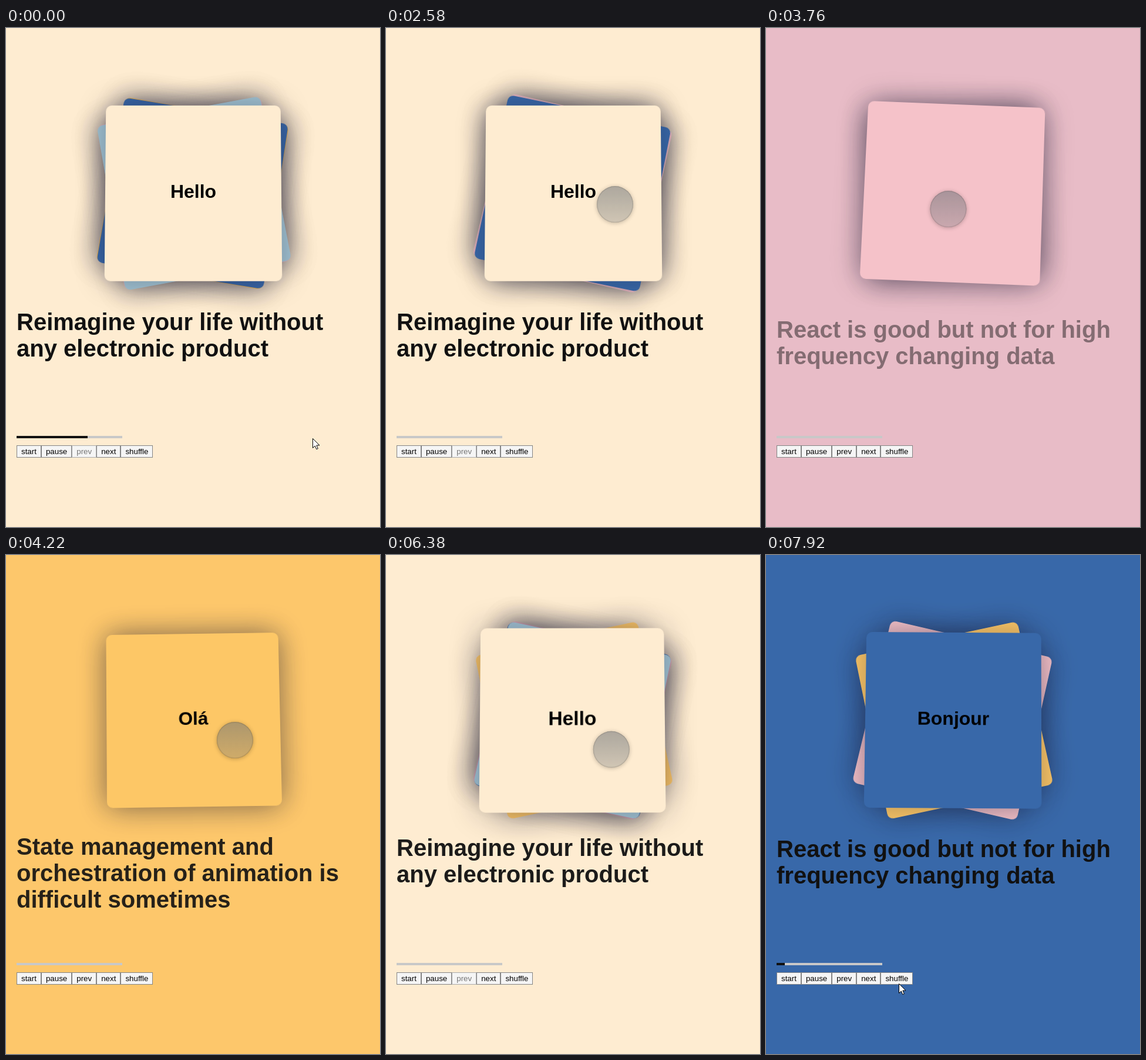
Animation of 637 by 849 pixels, one loop 8 s. Source, as an HTML page:

```html
<!DOCTYPE html>
<html lang="en">
<head>
<meta charset="utf-8">
<style>
  html, body { margin: 0; height: 100%; overflow: hidden; }
  body { position: relative; font-family: "Liberation Sans", Arial, "Noto Sans CJK JP", sans-serif; }
  .card, h1, #bar, #controls, #touch, #arrow, #popup { position: absolute; }
  .card {
    left: 168.5px; top: 129.5px; width: 300px; height: 300px; border-radius: 10px;
    font: bold 32px/297px "Liberation Sans", Arial, "Noto Sans CJK JP", sans-serif; text-align: center;
    box-shadow: 0 0 50px rgba(20, 20, 45, .33);
  }
  h1 { left: 18px; top: 478px; margin: 0; font-size: 40px; line-height: 45px; white-space: pre; color: #111; }
  #bar { left: 18px; top: 694px; width: 180px; height: 4px; background: #c8c8c8; }
  #fill { height: 4px; background: #111; }
  #controls { left: 18px; top: 710px; display: flex; }
  button {
    margin: 0; padding: 2px 7px; border: 1px solid #858585; border-radius: 0; height: 21px;
    font: 13.333px/15px "Liberation Sans", Arial, sans-serif; background: #f5f5f5; color: #000;
  }
  button:disabled { color: #777; border-color: #aaa; }
  #touch {
    left: -31px; top: -31px; width: 62px; height: 62px; border-radius: 50%; z-index: 20;
    background: linear-gradient(rgba(105, 110, 115, .55), rgba(105, 110, 115, .3));
    box-shadow: inset 0 0 2px rgba(0, 0, 0, .45), 0 1px 7px rgba(0, 0, 0, .25);
  }
  #arrow { left: 0; top: 0; z-index: 20; overflow: visible; }
  #popup { left: 56px; top: 247px; width: 30px; height: 30px; border-radius: 5px; background: #dc3a43; z-index: 15; }
</style>
</head>
<body>
<div id="bar"><div id="fill"></div></div>
<div id="controls"><button>start</button><button>pause</button><button id="prev">prev</button><button>next</button><button>shuffle</button></div>
<div id="popup"></div>
<div id="touch"></div>
<svg id="arrow" width="14" height="20"><path d="M.5 .5V16.5L4.3 13L6.8 18.7L9.3 17.6L6.9 12H12Z" fill="#fff" stroke="#000"/></svg>
<script>
const LOOP = 8000;
const $ = id => document.getElementById(id);
const clamp = v => Math.max(0, Math.min(1, v));

const color = {
  cream: [254, 236, 209], blue: [56, 104, 169], yellow: [253, 199, 102],
  sky: [162, 196, 211], pink: [245, 194, 201]
};
const rgb = c => `rgb(${c.map(Math.round)})`;

// Keys are [time, ...values]; monotone cubic interpolation through all of them.
function track(keys, t) {
  const last = keys.length - 1;
  if (t <= keys[0][0]) return keys[0].slice(1);
  if (t >= keys[last][0]) return keys[last].slice(1);
  let i = 0;
  while (t >= keys[i + 1][0]) i++;
  const h = keys[i + 1][0] - keys[i][0], u = (t - keys[i][0]) / h;
  return keys[i].slice(1).map((a, n) => {
    const c = n + 1, b = keys[i + 1][c];
    const secant = k => (keys[k + 1][c] - keys[k][c]) / (keys[k + 1][0] - keys[k][0]);
    const slope = k => {
      if (k === 0 || k === last) return 0;
      const p = secant(k - 1), q = secant(k);
      return p * q > 0 ? 2 * p * q / (p + q) : 0;
    };
    const v = 1 - u;
    return a * v * v * (1 + 2 * u) + b * u * u * (3 - 2 * u) + h * u * v * (v * slope(i) - u * slope(i + 1));
  });
}

// Card keys: time, x, rotation, scale.
const cards = {
  h: { text: 'Hello', fill: 'cream', keys: [
    [2600, 0, 0, 1], [2700, 0, 0, 1.05], [2850, 60, 2, 1.05], [3150, 700, 10, 1],
    [5700, 700, 0, 1], [5920, 233.5, 0, 1], [6180, 0, 0, 1],
    [6360, 0, 0, 1.05], [6540, -90, -3, 1.05], [6800, -700, -10, 1]] },
  b: { text: 'Bonjour', fill: 'blue', keys: [
    [0, 0, 9.2, .95], [1300, 0, 11.6, .95], [2850, 0, 11.6, .95], [3250, 0, 0, 1],
    [3390, 0, 0, 1], [3480, -5, 0, 1.047], [3590, -110, -4, 1.05], [3800, -700, -10, 1],
    [5640, -700, 0, .95], [5920, -367, 3, .955], [6250, 0, 11.6, .95],
    [7220, 0, 11.6, .95], [7860, 0, .6, 1], [7960, 0, .3, 1]] },
  p: { text: '', fill: 'pink', keys: [
    [0, 0, -10, .95], [1260, 0, 12.3, .95], [1600, 0, 13, .95], [3580, 0, 13, .95],
    [3780, 0, 2, 1.02], [3880, 80, 4, 1.05], [4090, 700, 10, 1],
    [5640, 700, 13, .95], [5920, 540, 13, .95], [6270, 0, 13, .95]] },
  o: { text: 'Olá', fill: 'yellow', keys: [
    [0, 0, 9.8, .95], [1260, 0, -1.5, .95], [3880, 0, -1.5, .95], [4220, 0, -.8, .985],
    [4500, 0, 0, 1], [5620, 0, 0, 1], [5860, -700, 0, 1],
    [5940, -700, -12, .95], [6270, 0, -12, .95]] },
  l: { text: 'こんにちは', fill: 'sky', keys: [
    [0, 0, -10.4, .95], [1260, 0, -1.2, .95], [4400, 0, -.5, .95], [5620, 0, 0, .95],
    [5700, 700, 12, .95], [5920, 298, 12, .95], [6220, 0, 12, .95], [6600, 0, 12, .95],
    [6960, 1, 6, .974], [7080, 6, 1, 1.04], [7220, 90, 3, 1.05], [7480, 700, 10, 1]] }
};

// Headings: text, time in, time out.
const lines = {
  hello: 'Reimagine your life without\nany electronic product',
  react: 'React is good but not for high\nfrequency changing data',
  state: 'State management and\norchestration of animation is\ndifficult sometimes',
  make: 'Make your best to take\nchallenge in your work'
};
const headings = [
  ['hello', -1000, 2850], ['react', 2850, 3600], ['state', 3800, 5640],
  ['hello', 5912, 6560], ['make', 6560, 7220], ['react', 7220, 9999]
].map(([name, start, end]) => {
  const el = document.createElement('h1');
  el.textContent = lines[name];
  document.body.append(el);
  return { el, start, end };
});

const backdrop = [
  [2850, 'cream'], [3220, 'blue'], [3600, 'blue'], [3790, 'pink'], [4290, 'yellow'], [5930, 'yellow'],
  [6180, 'cream'], [6540, 'cream'], [7020, 'sky'], [7200, 'sky'], [7600, 'blue']
].map(([t, name]) => [t, ...color[name]]);

const touchPath = [
  [1750, 680, 520], [2250, 410, 310], [2600, 390, 300], [2850, 450, 300], [3250, 365, 295],
  [3400, 360, 295], [3480, 355, 295], [3600, 250, 300], [3760, 310, 308], [3900, 420, 315],
  [4220, 390, 315], [4450, 380, 330], [5020, 195, 757], [5110, 195, 752], [5640, 196, 752],
  [5920, 203, 746], [6350, 390, 330], [6540, 290, 345], [6960, 233, 369], [7060, 236, 367],
  [7240, 400, 350], [7560, 700, 500]
];
const arrowPath = [
  [60, 522, 698], [700, 650, 860], [7400, 650, 820], [7860, 230, 732], [7920, 226, 729]
];

for (const key in cards) {
  const card = cards[key];
  card.el = document.createElement('div');
  card.el.className = 'card';
  card.el.textContent = card.text;
  card.el.style.background = rgb(color[card.fill]);
  document.body.append(card.el);
}

function place(el, path, t) {
  const [x, y] = track(path, t);
  el.style.transform = `translate(${x}px, ${y}px)`;
}

function draw(t) {
  document.body.style.background = rgb(track(backdrop, t));

  const order = t < 500 ? 'hlbpo' : t < 5640 ? 'hbpol' : 'hlbop';
  for (const key in cards) {
    const { el, keys } = cards[key];
    const [x, r, s] = track(keys, t);
    el.style.zIndex = 9 - order.indexOf(key);
    el.style.transform = `translateX(${x}px) perspective(1500px) rotateX(5deg) rotateY(${r / 10}deg) rotateZ(${r}deg) scale(${s})`;
  }

  for (const { el, start, end } of headings) {
    const rest = (1 - clamp((t - start) / 600)) ** 2, out = clamp((t - end) / 300);
    el.style.opacity = t < start ? 0 : (1 - rest) * (1 - out);
    el.style.transform = `translateY(${25 * out - 40 * rest}px)`;
  }

  const fill = t < 445 ? 121 + .036 * t : Math.max(0, 137 - .0739 * (t - 445), .036 * (t - 7530));
  $('fill').style.width = fill + 'px';
  $('prev').disabled = t < 2850 || (t >= 5700 && t < 6560);
  $('popup').hidden = t < 6640 || t > 7240;
  place($('touch'), touchPath, t);
  place($('arrow'), arrowPath, t);
}

const begin = performance.now();
function tick() {
  draw((performance.now() - begin) % LOOP);
  requestAnimationFrame(tick);
}
tick();
</script>
</body>
</html>
```
